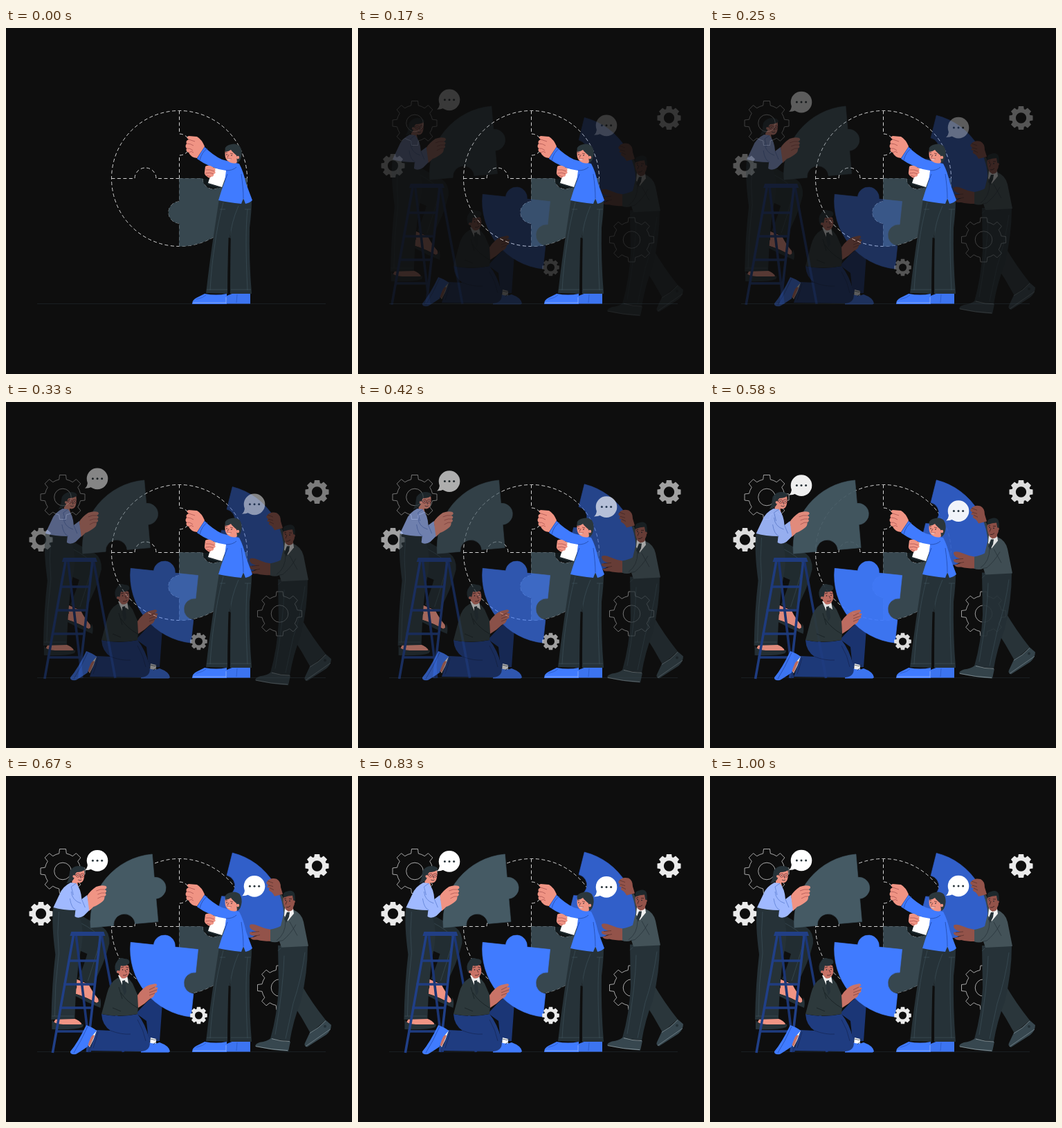
These frames come from a looping animation (500 px wide and 500 px high, 1.04 s). An HTML page with a canvas:

```html
<!DOCTYPE html>
<html lang="en">
<head>
<meta charset="utf-8">
<title>Puzzle team</title>
<style>
html, body { margin: 0; width: 100%; height: 100%; overflow: hidden; background: #0e0e0e; }
canvas { display: block; width: 100vw; height: 100vh; }
</style>
</head>
<body>
<canvas id="stage" width="500" height="500"></canvas>
<script>
const LOOP = 1040, STEP = 1000 / 24, SLIDE = 22;
const BG = '#0e0e0e', INK = '#263238', SLATE = '#37474f', GREY = '#455a64';
const BLUE = '#407bff', NAVY = '#1f3c80', PALE = '#a0b9ff', PINK = '#f09484';
const TAN = '#c97367', BROWN = '#93534a', WHITE = '#fff', LINE = '#16202a';
const TAU = Math.PI * 2;

const main = document.getElementById('stage').getContext('2d');
const spare = document.createElement('canvas');
spare.width = spare.height = 500;
const sheet = spare.getContext('2d');
let g = main;

function fill(d, color) {
  g.fillStyle = color;
  g.fill(new Path2D(d));
}

function line(d, color = LINE, width = 0.7) {
  g.strokeStyle = color;
  g.lineWidth = width;
  g.stroke(new Path2D(d));
}

function dot(x, y, r, color) {
  g.beginPath();
  g.arc(x, y, r, 0, TAU);
  g.fillStyle = color;
  g.fill();
}

// Draws a group flat, then lays it down with one opacity.
function layer(alpha, dx, dy, draw) {
  if (alpha <= 0) return;
  g = sheet;
  g.setTransform(1, 0, 0, 1, 0, 0);
  g.clearRect(0, 0, 500, 500);
  g.translate(dx, dy);
  draw();
  g = main;
  g.globalAlpha = alpha;
  g.drawImage(spare, 0, 0);
  g.globalAlpha = 1;
}

function notchedEdge() {
  g.moveTo(0, 0);
  g.lineTo(33.5, 0);
  g.arc(49, 0, 15.5, Math.PI, 0, true);
  g.lineTo(98, 0);
}

function piece(x, y, deg, color) {
  g.save();
  g.translate(x, y);
  g.rotate(deg * Math.PI / 180);
  g.beginPath();
  notchedEdge();
  g.arc(0, 0, 98, 0, Math.PI / 2);
  g.lineTo(0, 64.5);
  g.arc(0, 49, 15.5, Math.PI / 2, Math.PI * 1.5);
  g.closePath();
  g.fillStyle = g.strokeStyle = color;
  g.lineWidth = 0.6;
  g.fill();
  g.stroke();
  g.restore();
}

function board() {
  g.save();
  g.translate(250.5, 217.5);
  g.setLineDash([5, 3.5]);
  g.strokeStyle = '#d4d4d4';
  g.lineWidth = 1;
  for (let i = 0; i < 4; i++) {
    g.beginPath();
    notchedEdge();
    g.stroke();
    g.rotate(Math.PI / 2);
  }
  g.beginPath();
  g.arc(0, 0, 98, 0, TAU);
  g.stroke();
  g.restore();
  piece(250.5, 217.5, 0, SLATE);
}

function gearPath(x, y, r, body, half) {
  g.beginPath();
  for (let i = 0; i < 8; i++) {
    const a = i * TAU / 8;
    const c = Math.cos(a), s = Math.sin(a);
    const at = (u, v) => g.lineTo(x + c * u - s * v, y + s * u + c * v);
    const root = Math.sqrt(body * body - half * half), gap = Math.asin(half / body);
    at(root, -half);
    at(r, -half * 0.85);
    at(r, half * 0.85);
    at(root, half);
    g.arc(x, y, body, a + gap, a + TAU / 8 - gap);
  }
  g.closePath();
}

function wireGear(x, y) {
  gearPath(x, y, 32, 26, 5.3);
  g.moveTo(x + 12.3, y);
  g.arc(x, y, 12.3, 0, TAU);
  g.strokeStyle = '#d0d0d0';
  g.lineWidth = 0.8;
  g.stroke();
}

function solidGear(x, y, r) {
  gearPath(x, y, r, r * 0.79, r * 0.25);
  g.moveTo(x + r * 0.45, y);
  g.arc(x, y, r * 0.45, 0, TAU);
  g.fillStyle = '#ebebeb';
  g.fill('evenodd');
}

function bubble(x, y) {
  dot(x, y, 15.3, WHITE);
  fill(`M${x - 14} ${y + 4} Q${x - 14} ${y + 11} ${x - 18} ${y + 14} Q${x - 12} ${y + 14} ${x - 8} ${y + 12}Z`, WHITE);
  for (const d of [-6.6, 0, 6.6]) dot(x + d, y, 1.5, INK);
}

function ladder() {
  line('M101 231 L121 399 M138 231 L169 399', '#1b3574', 3.6);
  line('M90 267 H133 M83 301 H129 M77 335 H125 M71 369 H121', NAVY, 3.6);
  line('M97 231 L67 400 M136 231 L117 399', '#203f87', 3.6);
  fill('M94 225 H141 L143 231 H92Z', '#213f86');
}

function climber() {
  // far leg and shoe
  fill('M100 293 L119 301 Q125 313 133 322 L134 330 Q118 320 98 314 L102 305Z', PINK);
  fill('M98 314 Q117 320 129 328 Q135 327 135 320 Q138 327 136 335 Q116 327 98 317Z', INK);
  fill('M94 193 Q118 208 140 219 Q150 226 149 242 Q142 272 124 303 L104 293 Q113 272 117 257 L92 246Z', '#222d32');
  line('M107 212 Q130 224 136 234 Q134 248 118 296', GREY, 0.5);
  // near leg and shoe
  fill('M72 350 H97 Q108 354 109 359 L67 359Z', PINK);
  fill('M66 352 Q68 358 82 359 H107 Q114 357 110 363 Q99 367 66 366Z', INK);
  fill('M68 190 L101 193 Q114 214 109 246 Q101 282 99 351 L65 352 Q66 300 71 258 Q65 214 68 190Z', INK);
  line('M76 196 Q73 226 76 256 Q70 302 70 347 M66 347 H98', GREY, 0.5);
  ladder();
  piece(219.5, 210.6, 175, GREY);
  // head
  fill('M95 139 L112 134 Q114 142 112 149 Q110 156 103 154 L104 160 L95 158Z', PINK);
  fill('M92 137 Q97 130 104 130 Q113 130 114 135 Q110 139 102 139 Q99 141 98 148 Q95 154 87 155 Q91 149 91 143Z', INK);
  dot(98, 145, 2, PINK);
  g.strokeStyle = '#692a32';
  g.lineWidth = 0.7;
  for (const x of [103.5, 110]) {
    g.beginPath();
    g.arc(x, 143.5, 2.7, 0, TAU);
    g.stroke();
    dot(x, 143.5, 0.8, INK);
  }
  line('M98 143 L101 143 M107 145 L108 148 M104 150 Q107 152 109 150');
  // shirt and hands
  fill('M93 154 Q81 160 77 171 L68 190 Q82 194 100 194 L99 203 Q104 207 112 202 L121 193 L117 172 L109 178 Q108 163 101 155Z', PALE);
  line('M101 155 L94 160 L97 172 M94 167 Q95 180 108 184 M92 177 Q94 191 101 194 M109 178 L114 190', '#5578cd', 0.7);
  fill('M117 173 Q121 166 130 160 Q138 157 144 159 Q147 162 142 164 Q147 166 143 169 Q146 172 142 174 Q143 179 137 183 Q130 188 126 189 L120 195Z', PINK);
  line('M130 166 Q136 163 142 164 M132 171 Q138 168 143 169 M132 177 Q138 173 142 174', '#a64e4c');
}

function kneeler() {
  fill('M188 343 L204 326 Q224 308 226 327 L222 383 H206 L203 354Z', '#1b3676');
  fill('M209 378 L217 380 L217 387 H208Z', WHITE);
  fill('M207 385 Q214 388 222 385 Q236 390 237 398 L235 399.5 H195 L196 388Z', BLUE);
  line('M209 380 Q215 383 220 380 M213 388 L217 384', INK);
  fill('M138 344 Q163 350 190 344 Q201 357 207 380 Q211 397 195 398 L121 397 Q126 382 130 367 L151 368 Q139 360 138 344Z', NAVY);
  line('M151 368 Q167 374 180 373 M133 370 Q130 382 126 393 M190 352 Q199 367 202 383', '#16295a', 0.8);
  fill('M123 366 L131 368 Q127 381 121 392 L116 385Z', '#eee');
  fill('M122 373 L128 375 L121 391 L116 386Z', TAN);
  fill('M116 360 Q125 363 131 368 Q126 374 123 377 Q119 386 118 391 Q108 398 101 402 Q92 403 93 398 Q104 385 116 360Z', BLUE);
  line('M118 362 Q108 384 98 400', '#244fb5', 0.8);
  piece(277.6, 250.6, 96, BLUE);
  // body
  fill('M161 292 Q150 298 146 314 L138 344 Q163 349 190 344 L191 334 L190 316 L183 300 Q178 293 174 290Z', '#2d393c');
  fill('M162 288 L175 288 L177 300 L173 297 L168 302Z', '#f0f0f0');
  fill('M168 296 L172 295 L174 312 L171 317 L168 306Z', INK);
  line('M166 313 Q174 326 190 335 M163 305 L168 322 M154 335 L166 340', '#151d20');
  // head
  fill('M162 276 Q169 270 177 274 Q180 284 176 289 Q172 294 167 292 L163 287Z', TAN);
  fill('M159 284 Q155 274 161 267 Q164 261 171 264 Q180 264 178 271 Q172 276 166 274 Q165 280 163 285Z', INK);
  dot(162, 283, 2, TAN);
  dot(168.5, 280, 0.8, LINE);
  dot(175, 279.5, 0.8, LINE);
  line('M166 277 L170 276 M173 276 L177 277 M172 280 L174 284 M169 288 Q173 289 175 286', '#301b20');
  fill('M190 317 Q198 305 207 302 L216 300 Q221 302 215 305 Q222 305 218 309 Q220 312 215 314 Q215 319 208 322 Q200 330 191 335Z', TAN);
  line('M207 309 L215 305 M207 313 L218 309 M207 317 L215 314', '#783b39');
}

function carrier() {
  // far leg and shoe
  fill('M427 302 Q442 328 462 353 L440 372 Q427 348 413 327Z', '#2a363b');
  fill('M462 353 L470 360 Q470 368 463 374 L435 392 Q430 390 432 386 L439 371 Q451 365 462 353Z', SLATE);
  line('M439 372 Q452 365 462 354 M433 391 L469 366', '#91a0a6', 0.6);
  dot(461, 362, 2, INK);
  // near leg and shoe
  fill('M393 245 H436 Q436 285 426 326 Q415 354 410 384 L382 380 Q392 345 394 306Z', INK);
  line('M432 255 Q427 293 415 329 L404 380 M402 260 Q401 305 389 374 M397 249 L393 253', GREY, 0.5);
  fill('M383 379 Q397 384 411 384 L408 398 Q386 397 360 391 Q360 387 367 385 Q377 384 383 379Z', SLATE);
  line('M384 380 Q397 384 410 384 M361 391 Q383 396 407 397', '#b3bfc4', 0.6);
  fill('M388 171 L399 172 L407 195 L401 215 L397 205Z', '#374449');
  piece(303.5, 206.5, -76, '#315fc9');
  fill('M398 248 L395 239 Q389 242 381 239 L382 222 Q392 220 397 217 L402 197 L414 193 Q427 198 430 211 L437 246Z', '#435258');
  line('M404 210 Q404 229 391 238 M410 211 L421 231 M419 215 Q411 229 400 238 L395 239', INK);
  fill('M403 191 L415 192 L416 199 L407 210 L402 202Z', '#f2f2f2');
  fill('M406 197 L410 197 L409 204 L405 212 L402 207Z', INK);
  // head
  fill('M401 174 L416 171 Q419 184 415 190 Q416 195 408 196 L404 193 Q399 183 401 174Z', BROWN);
  fill('M401 176 Q399 168 406 167 Q414 164 417 170 Q419 179 416 184 L414 173 Q408 173 401 176Z', '#1d282c');
  dot(416, 182, 1.8, BROWN);
  dot(404, 180, 0.8, LINE);
  dot(410, 181, 0.8, LINE);
  line('M402 178 L405 177 M409 178 L413 178 M406 181 L404 186 M405 190 Q408 191 411 188', '#261516');
  // hands on the piece
  fill('M378 152 Q382 147 391 149 Q397 152 397 161 L400 171 L388 174 Q385 168 382 167 Q378 165 381 162 Q375 162 379 158 Q374 155 378 152Z', BROWN);
  fill('M352 216 Q355 213 365 217 Q374 221 382 222 V239 Q371 239 363 237 Q356 238 353 234 Q359 233 363 231 Q351 232 352 226 L362 225 Q351 222 352 216Z', BROWN);
  line('M379 158 L386 160 M381 162 L387 165 M378 152 L386 155 M355 226 L366 225 M358 232 L367 230', '#532e2c');
}

function guide() {
  fill('M287 384 Q304 387 319 384 L319 399 H269 Q269 393 275 390Z', BLUE);
  fill('M319 387 L329 383 H353 V398.5 H318Z', '#3c74f0');
  line('M270 397 H318 M318 389 L318 398', '#9fbcff', 0.7);
  line('M275 392 Q285 390 289 386 M334 385 L333 397', '#244fb5', 0.6);
  fill('M308 247 L355 250 Q355 264 352 289 Q351 334 355 384 H324 Q324 334 325 292 Q321 310 320 384 L289 383 Q295 332 301 293Z', INK);
  line('M314 252 Q305 286 302 312 Q297 342 295 379 M336 257 Q325 282 324 304 M349 262 Q345 299 349 379 M290 378 H320 M325 378 H354 M309 262 H317 M345 262 H354', GREY, 0.5);
  line('M322.5 303 Q321 338 321.5 384', BG, 1.8);
  // clipboard
  fill('M285 218 H312 V230 Q304 233 297 231 Q290 230 285 222Z', '#11191c');
  fill('M299 202 L321 205 L312 230 L292 224Z', WHITE);
  line('M291 225 L312 231', INK, 1.2);
  // shirt
  fill('M286 171 Q299 184 312 190 L327 194 L337 196 Q343 207 347 225 L356 249 Q352 253 346 254 L343 246 L340 254 Q321 252 307 249 Q311 235 316 222 L318 206 Q295 203 276 189Z', BLUE);
  line('M291 174 Q283 179 280 191 M287 172 L276 188 M318 206 Q328 206 333 201 M340 211 Q343 231 343 246 M316 222 L320 211', '#234ba9', 0.8);
  // head
  fill('M317 176 Q325 173 335 181 L336 191 L333 195 Q327 197 320 192 Q315 187 317 176Z', PINK);
  fill('M317 179 Q315 171 322 169 Q332 165 338 171 Q342 178 340 186 Q338 194 334 195 L333 184 Q327 179 325 176 Q321 179 317 179Z', '#2b373c');
  dot(335, 187, 2.2, PINK);
  dot(319, 183, 0.8, LINE);
  dot(326, 184, 0.8, LINE);
  line('M317 180 L320 180 M324 181 L328 182 M322 183 L320 187', '#5c2d2d');
  fill('M319 188 Q322 190 326 189 Q322 193 319 188Z', '#fff4f1');
  line('M319 188 Q322 190 326 189', '#8d3434', 0.6);
  // hands
  fill('M288 200 Q293 197 299 201 Q304 203 302 207 Q304 210 300 211 Q301 215 296 215 Q294 218 291 215 Q286 212 287 208Z', PINK);
  line('M289 205 Q295 204 301 207 M288 210 Q295 208 300 211 M290 213 L296 215', '#a64e4c');
  fill('M287 171 Q283 161 276 157 L264 156 Q259 158 264 161 Q259 163 261 167 Q258 171 261 174 Q259 178 264 180 Q267 187 276 188Z', PINK);
  line('M264 161 L273 164 M261 167 Q267 167 271 170 M261 174 Q266 173 270 177 M264 180 Q268 177 271 180', '#a64e4c');
}

// cubic-bezier(.36, -.01, .5, 1.38)
function ease(x) {
  if (x <= 0) return 0;
  if (x >= 1) return 1;
  const curve = (a, b, s) => 3 * (1 - s) ** 2 * s * a + 3 * (1 - s) * s * s * b + s ** 3;
  let lo = 0, hi = 1;
  for (let i = 0; i < 24; i++) {
    const mid = (lo + hi) / 2;
    if (curve(0.36, 0.5, mid) < x) lo = mid;
    else hi = mid;
  }
  return curve(-0.01, 1.38, lo);
}

function render(ms) {
  const k = Math.floor((ms + 4) / STEP);
  const p = k < 2 ? 0 : ease((k + 1.5) / 25);
  const alpha = Math.min(1, p), off = SLIDE * (1 - p);
  g = main;
  g.fillStyle = BG;
  g.fillRect(0, 0, 500, 500);
  line('M45 398.5 H462', '#1d2427', 0.8);
  layer(alpha, 0, 0, () => {
    wireGear(82, 137.5);
    wireGear(395.5, 306);
    solidGear(50.5, 199, 17);
    solidGear(449.5, 130, 17);
  });
  board();
  layer(alpha, -off, 0, climber);
  layer(alpha, 0, 0, kneeler);
  layer(alpha, 0, 0, () => solidGear(278.5, 346, 12.3));
  layer(alpha, 0, off, carrier);
  guide();
  layer(alpha, 0, -off, () => {
    bubble(132, 122);
    bubble(359, 159);
  });
}

const start = performance.now();
function tick() {
  render((performance.now() - start) % LOOP);
  requestAnimationFrame(tick);
}
tick();
</script>
</body>
</html>
```
